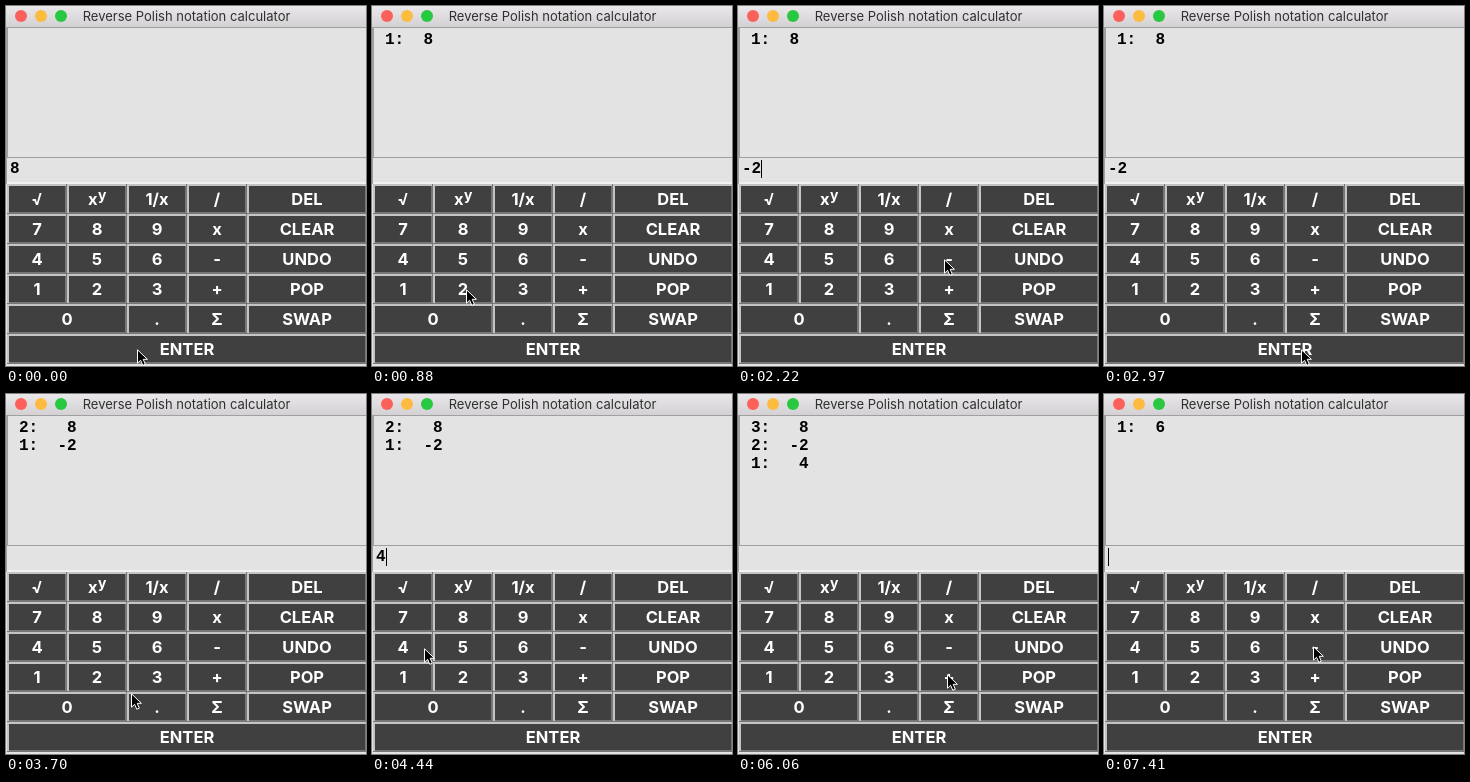
Animation, 360 px wide and 360 px high, one loop 8 s. Source, as an HTML page with a canvas:

```html
<!DOCTYPE html>
<html lang="en">
<head>
<meta charset="utf-8">
<title>Calculator</title>
<style>
html, body { margin: 0; width: 100%; height: 100%; overflow: hidden; background: #e3e3e3; }
canvas { display: block; width: 360px; height: 360px; }
</style>
</head>
<body>
<canvas id="stage" width="360" height="360"></canvas>
<script>
const ctx = document.getElementById('stage').getContext('2d');
const LOOP = 8000, TICK = 148, LEAD = 8;
const SANS = 'Inter, "Open Sans", sans-serif';
const MONO = 'bold 16px "Liberation Mono", monospace';

// Buttons: label, column, row, column span
const rows = [
  ['√', 'xy', '1/x', '/', 'DEL'],
  ['7', '8', '9', 'x', 'CLEAR'],
  ['4', '5', '6', '-', 'UNDO'],
  ['1', '2', '3', '+', 'POP'],
  ['0', null, '.', 'Σ', 'SWAP'],
  ['ENTER']
];
const columns = [1, 61, 121, 181, 241, 361];
const buttons = rows.flatMap((labels, row) => labels.flatMap((label, col) => {
  if (label === null) return [];
  const end = label === 'ENTER' ? 5 : label === '0' ? 2 : col + 1;
  return [{ label, x: columns[col], y: 178 + row * 30, w: columns[end] - columns[col] }];
}));

// Each state holds from its tick until the next one
const states = [
  { at: 0, stack: [], entry: '8' },
  { at: 2, stack: [8], entry: '', caretEnd: 4 },
  { at: 8, stack: [8], entry: '2', caretEnd: 10 },
  { at: 15, stack: [8], entry: '-2', caretEnd: 17 },
  { at: 21, stack: [8, -2], entry: '', caretEnd: 23 },
  { at: 30, stack: [8, -2], entry: '4', caretEnd: 31 },
  { at: 36, stack: [8, -2, 4], entry: '', caretEnd: 38 },
  { at: 43, stack: [8, 2], entry: '', caretEnd: 47 },
  { at: 50, stack: [6], entry: '', caretEnd: 55 }
];
const presses = { 1: 'ENTER', 7: '2', 14: '-', 29: '4', 35: 'ENTER', 42: '+' };

// Pointer stops: tick, x, y
const path = [
  [0, 131, 343], [2, 131, 343], [6, 94, 283], [9, 94, 283], [11, 179, 273],
  [13, 206, 253], [17, 206, 253], [20, 197, 343], [22, 197, 343], [28, 52, 254],
  [30, 52, 254], [34, 148, 342], [37, 148, 342], [41, 209, 280], [46, 209, 280],
  [49, 209, 252], [55, 209, 252]
];

function rect(color, x, y, w, h) {
  ctx.fillStyle = color;
  ctx.fillRect(x, y, w, h);
}

function text(str, x, y, font, color, align = 'left') {
  ctx.font = font;
  ctx.fillStyle = color;
  ctx.textAlign = align;
  ctx.fillText(str, x, y);
}

function drawWindow() {
  rect('#e3e3e3', 0, 0, 360, 360);
  const bar = ctx.createLinearGradient(0, 0, 0, 21);
  bar.addColorStop(0, '#e9e7e9');
  bar.addColorStop(1, '#d3d1d3');
  rect(bar, 0, 0, 360, 21);
  ['#fc605b', '#fdbc40', '#28c840'].forEach((color, i) => {
    ctx.fillStyle = color;
    ctx.beginPath();
    ctx.arc(15 + 20 * i, 10, 6, 0, 2 * Math.PI);
    ctx.fill();
  });
  text('Reverse Polish notation calculator', 180.5, 15, '13px ' + SANS, '#303030', 'center');
  rect('#a0a0a0', 0, 21, 360, 1);
  rect('#a0a0a0', 0, 21, 2, 131);
  rect('#a0a0a0', 0, 151, 360, 1);
  rect('#a0a0a0', 0, 152, 1, 26);
  rect('#f2f2f2', 1, 176, 359, 2);
}

function drawButton({ label, x, y, w }, pressed) {
  const light = '#c4c4c4', dark = '#777777';
  rect(pressed ? light : dark, x, y, w, 30);
  rect(pressed ? dark : light, x, y, w - 1, 2);
  rect(pressed ? dark : light, x, y, 2, 29);
  rect('#404040', x + 2, y + 2, w - 4, 26);
  const cx = x + w / 2, base = y + 21;
  const font = 'bold 16.5px ' + SANS;
  if (label === 'xy') {
    text('x', cx - 9, base, font, '#fff');
    text('y', cx + 1, base - 5, 'bold 14px ' + SANS, '#fff');
  } else {
    text(label, cx, base, font, '#fff', 'center');
  }
}

function drawPointer(tick) {
  const next = Math.max(1, path.findIndex(stop => stop[0] >= tick));
  const [t0, x0, y0] = path[next - 1], [t1, x1, y1] = path[next];
  const k = (tick - t0) / (t1 - t0);
  ctx.save();
  ctx.translate(Math.round(x0 + (x1 - x0) * k), Math.round(y0 + (y1 - y0) * k));
  const shape = new Path2D('M.5 .8V14.2L3.6 11.3L5.8 16.3L8.3 15.2L6.2 10.3H10.4Z');
  ctx.fillStyle = '#000';
  ctx.strokeStyle = '#fff';
  ctx.lineWidth = 1;
  ctx.fill(shape);
  ctx.stroke(shape);
  ctx.restore();
}

function draw(time) {
  const tick = Math.floor((time % LOOP + LEAD) / TICK);
  const { stack, entry, caretEnd = 0 } = states.findLast(state => state.at <= tick);
  drawWindow();

  const width = Math.max(...stack.map(value => String(value).length));
  stack.forEach((value, i) => {
    const line = `${stack.length - i}:  ${String(value).padStart(width)}`;
    text(line, 13, 38 + 18 * i, MONO, '#000');
  });
  text(entry, 4, 167, MONO, '#000');
  if (tick < caretEnd) rect('#000', 4 + Math.round(entry.length * 9.6), 154, 1, 18);

  buttons.forEach(button => drawButton(button, presses[tick] === button.label));
  drawPointer(tick);
}

function frame(now) {
  draw(now);
  requestAnimationFrame(frame);
}
requestAnimationFrame(frame);
</script>
</body>
</html>
```
